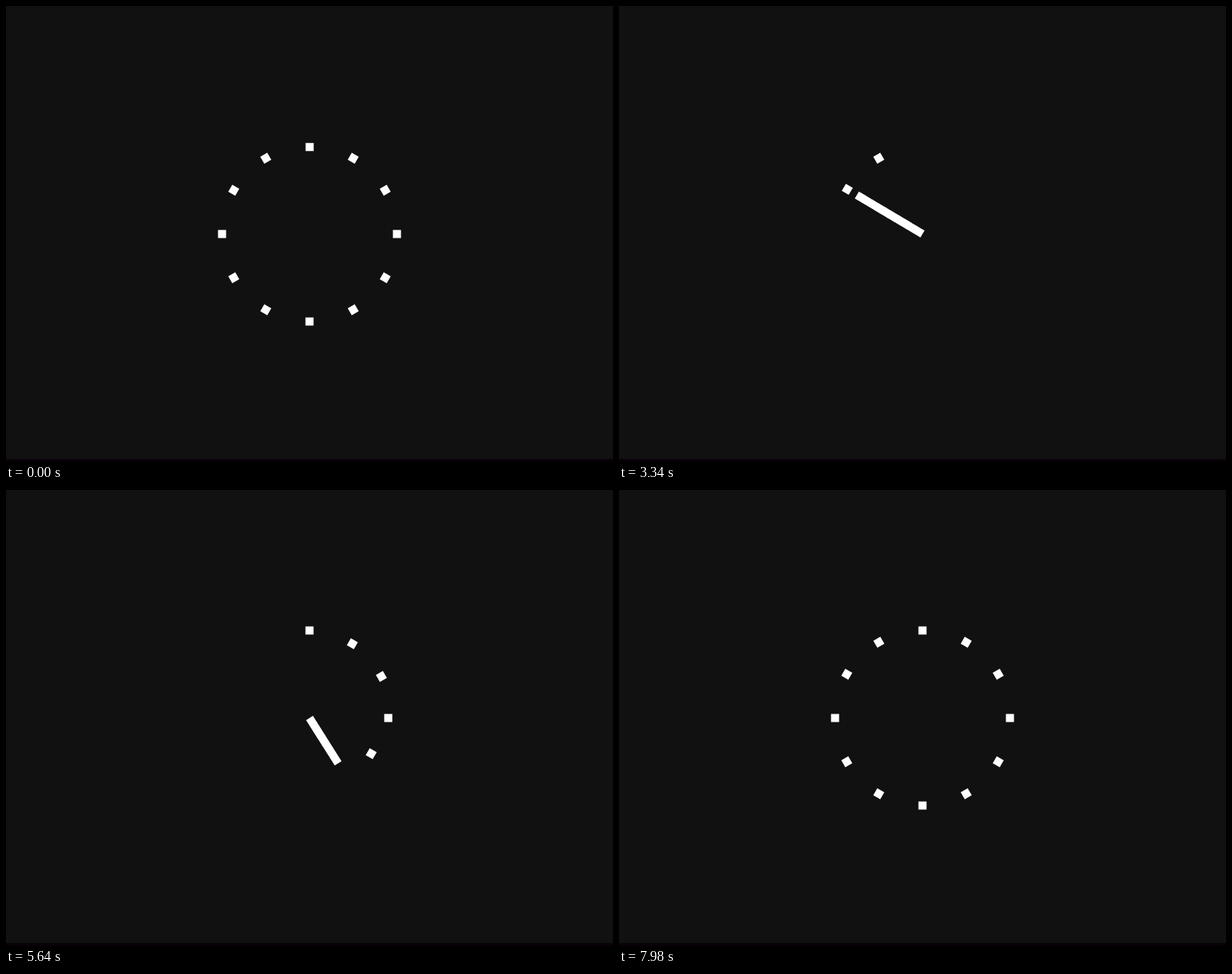
Animation of 826x620 px, one loop 8 s. Source, as an HTML page with a canvas:

```html
<!DOCTYPE html>
<html lang="en">
<head>
<meta charset="utf-8">
<title>Clock of squares</title>
<style>
  html, body { margin: 0; width: 826px; height: 620px; overflow: hidden; background: #111; }
  canvas { display: block; }
</style>
</head>
<body>
<canvas id="stage" width="826" height="620"></canvas>
<script>
const ctx = document.getElementById("stage").getContext("2d");

const LOOP = 8000, HALF = LOOP / 2;
const COUNT = 12, STEP = HALF / COUNT;
const CX = 413, CY = 310, SIZE = 11, RING = 119;
const TURN = 2 * Math.PI;

const quadIn = x => x * x;
const quadOut = x => 1 - (1 - x) * (1 - x);
const circOut = x => Math.sqrt(1 - (1 - x) * (1 - x));
const mix = (a, b, x) => a + (b - a) * x;

// Distance from the centre of the square in a given slot of the hand
const slot = i => mix(SIZE / 2, RING, i / (COUNT - 1));

function drawSquare(angle, radius) {
  ctx.save();
  ctx.translate(CX, CY);
  ctx.rotate(angle);
  ctx.fillRect(-SIZE / 2, -radius - SIZE / 2, SIZE, SIZE);
  ctx.restore();
}

// First turn: the hand sweeps up each square and pulls it inwards
function gather(i, time, hand) {
  const age = time - i * STEP;
  if (age < 0) return drawSquare(i / COUNT * TURN, RING);
  const ease = i < COUNT / 2 ? quadOut : quadIn;
  drawSquare(hand, mix(RING, slot(i), ease(Math.min(1, age / STEP))));
}

// Second turn: the hand drops its outermost square, which drifts to the ring
function scatter(i, time, hand) {
  const start = i * STEP;
  const home = slot(COUNT - 1 - i);
  if (time < start) return drawSquare(hand, home);
  const x = (time - start) / (HALF - start);
  drawSquare(i / COUNT * TURN, mix(home, RING, circOut(x)));
}

function draw(now) {
  const t = now % LOOP;
  const time = t % HALF;
  const hand = time / HALF * TURN;
  const place = t < HALF ? gather : scatter;

  ctx.fillStyle = "#111";
  ctx.fillRect(0, 0, 826, 620);
  ctx.fillStyle = "#080208";
  ctx.fillRect(0, 616, 826, 4);
  ctx.fillStyle = "#fff";
  for (let i = 0; i < COUNT; i++) place(i, time, hand);
}

const begin = performance.now();
function tick() {
  draw(performance.now() - begin);
  requestAnimationFrame(tick);
}
tick();
</script>
</body>
</html>
```
